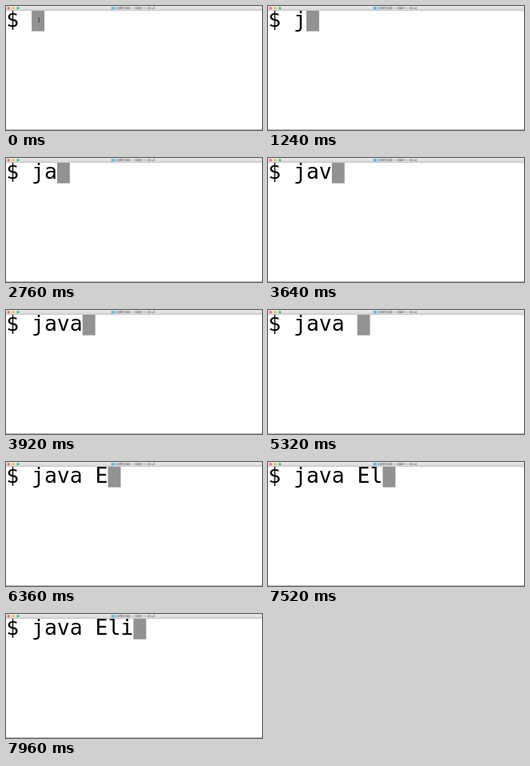
An HTML page for the animation above (8000 ms loop, 320 by 155 pixels).

```html
<!DOCTYPE html>
<html lang="en">
<head>
<meta charset="utf-8">
<title>Terminal</title>
<style>
  html, body { margin: 0; width: 100%; height: 100%; overflow: hidden; background: #fff; }
  svg { display: block; width: 100vw; height: 100vh; }
  .title { font: 3.9px Inter, "Liberation Sans", sans-serif; fill: #4c4c4c; }
  .line { font: 26.4px "DejaVu Sans Mono", monospace; white-space: pre; fill: #000; }
</style>
</head>
<body>
<svg viewBox="0 0 320 155">
  <defs>
    <linearGradient id="bar" x2="0" y2="1">
      <stop offset="0" stop-color="#ececec"/>
      <stop offset="1" stop-color="#d4d4d4"/>
    </linearGradient>
  </defs>
  <rect width="320" height="155" fill="#fff"/>
  <rect width="320" height="5.6" fill="url(#bar)"/>
  <rect y="5.4" width="320" height=".6" fill="#b4b4b4"/>
  <circle cx="3.2" cy="2.6" r="1.6" fill="#f95f57"/>
  <circle cx="9" cy="2.6" r="1.6" fill="#f8bd35"/>
  <circle cx="14.9" cy="2.6" r="1.6" fill="#39c84a"/>
  <rect x="131.6" y="1" width="4.2" height="3.6" rx=".4" fill="#62b9e4"/>
  <text class="title" x="137" y="4.2">Download — bash — 20×5</text>
  <rect y="154" width="320" height="1" fill="#b8b8b8"/>

  <rect id="cursor" y="6" width="15.9" height="25.6" fill="#929292"/>
  <text id="line" class="line" x=".3" y="25.9"></text>
  <path id="pointer" d="M40 14.6q1.2 0 1.2 .7v4.4q0 .7-1.2 .7M42.4 14.6q-1.2 0-1.2 .7v4.4q0 .7 1.2 .7M40.6 17.8h1.2"
        fill="none" stroke="#404040" stroke-width=".6"/>
</svg>
<script>
  const LOOP = 8000, CELL = 15.9, LEFT = 0.3;
  const prompt = "$ ", command = "java Eli";
  const keyTimes = [1240, 2760, 3640, 3920, 5320, 6360, 7520, 7960];
  const [cursor, line, pointer] =
    ["cursor", "line", "pointer"].map(id => document.getElementById(id));
  const start = performance.now();
  let shown = -1;

  function draw(now) {
    const t = Math.max(0, now - start) % LOOP;
    const typed = keyTimes.filter(k => k <= t).length;
    if (typed !== shown) {
      shown = typed;
      const text = prompt + command.slice(0, typed);
      line.textContent = text;
      cursor.setAttribute("x", LEFT + text.length * CELL);
      pointer.style.display = typed ? "none" : "";
    }
    requestAnimationFrame(draw);
  }
  draw(start);
</script>
</body>
</html>
```
